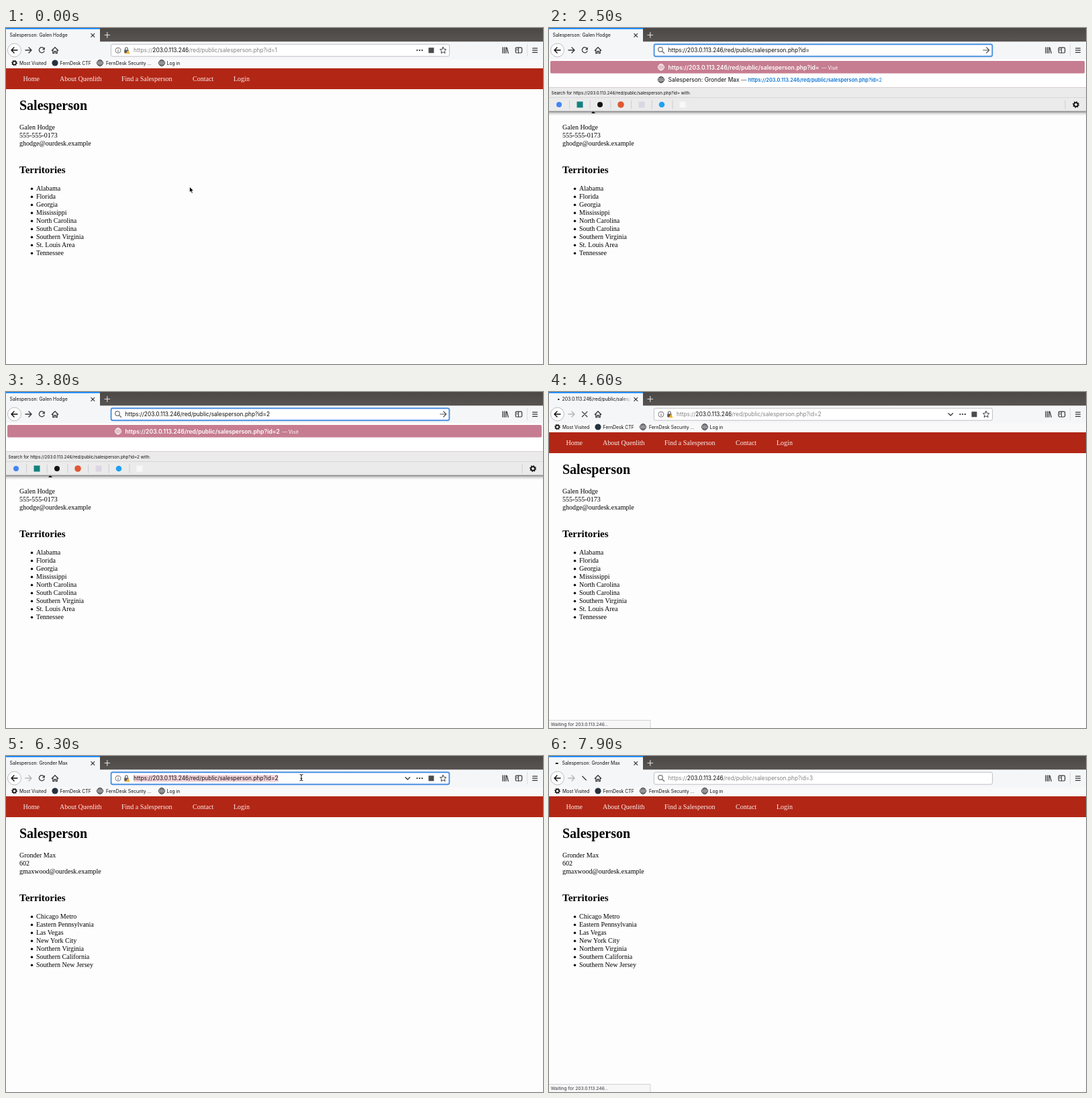
Write an HTML page that moves like this. It is 800 by 500 pixels and loops after 8000 ms.

```html
<!DOCTYPE html>
<html lang="en">
<head>
<meta charset="utf-8">
<title>Salesperson directory</title>
<style>
  html, body { margin: 0; width: 100%; height: 100%; overflow: hidden; background: #fff; }
  svg { display: block; width: 800px; height: 500px; }
  text { white-space: pre; font-family: Inter, "Open Sans", sans-serif; }
  .page text { font-family: "Liberation Serif", "Noto Serif", serif; }
</style>
</head>
<body>
<svg id="stage" viewBox="0 0 800 500"></svg>
<script>
const LOOP = 8000, STEP = 100;
const INK = '#0c0c0d', ICON = '#38383d', GREY = '#828285', URL_SIZE = 8.35;
const HOST = '203.0.113.246', PATH = '/red/public/salesperson.php?id=';
const BASE = 'https://' + HOST + PATH;

const PEOPLE = {
  1: {
    name: 'Galen Hodge', lines: ['Galen Hodge', '555-555-0173', 'ghodge@ourdesk.example'],
    areas: ['Alabama', 'Florida', 'Georgia', 'Mississippi', 'North Carolina', 'South Carolina',
      'Southern Virginia', 'St. Louis Area', 'Tennessee']
  },
  2: {
    name: 'Gronder Max', lines: ['Gronder Max', '602', 'gmaxwood@ourdesk.example'],
    areas: ['Chicago Metro', 'Eastern Pennsylvania', 'Las Vegas', 'New York City',
      'Northern Virginia', 'Southern California', 'Southern New Jersey']
  }
};

// One visit: focus the address, deselect, erase the digit, type another, press enter.
const VISITS = [
  { focus: 800, deselect: 1400, erase: 2000, type: 3200, enter: 4100, from: 1, to: 2 },
  { focus: 6000, deselect: 6500, erase: 6800, type: 7400, enter: 7700, from: 2, to: 3 }
];
const LOADED = 4900;

const svg = document.getElementById('stage');
const pen = document.createElement('canvas').getContext('2d');

function textWidth(s, size) {
  pen.font = `${size * 10}px Inter, "Open Sans", sans-serif`;
  return pen.measureText(s).width / 10;
}
const attrs = o => Object.entries(o).map(([k, v]) => `${k}="${v}"`).join(' ');
const text = (x, y, size, s, o = {}) =>
  `<text x="${x}" y="${y}" font-size="${size}" ${attrs({ fill: INK, ...o })}>${s}</text>`;
const span = (s, o) => `<tspan ${attrs(o)}>${s}</tspan>`;
const rect = (x, y, w, h, fill, o = {}) =>
  `<rect x="${x}" y="${y}" width="${w}" height="${h}" fill="${fill}" ${attrs(o)}/>`;
const dot = (x, y, r, fill, o = {}) =>
  `<circle cx="${x}" cy="${y}" r="${r}" fill="${fill}" ${attrs(o)}/>`;
const line = (d, stroke = ICON, w = 1.25, o = {}) =>
  `<path d="${d}" fill="none" stroke="${stroke}" stroke-width="${w}" stroke-linecap="round" stroke-linejoin="round" ${attrs(o)}/>`;
const title = id => 'Salesperson: ' + PEOPLE[id].name;

const globe = (x, y, c = ICON) => dot(x, y, 4.5, 'none', { stroke: c }) +
  line(`M${x - 4.5} ${y}h9M${x} ${y - 4.5}v9M${x - 3.5} ${y - 2.4}h7M${x - 3.5} ${y + 2.4}h7`, c, .7) +
  `<ellipse cx="${x}" cy="${y}" rx="2.2" ry="4.5" fill="none" stroke="${c}" stroke-width=".8"/>`;

const gear = (x, y, r) => dot(x, y, r * .62, 'none', { stroke: INK, 'stroke-width': r * .36 }) +
  dot(x, y, r * .88, 'none', { stroke: INK, 'stroke-width': r * .32, 'stroke-dasharray': `${r * .3} ${r * .391}` });

const magnifier = () => dot(166, 32, 3.3, 'none', { stroke: '#737377', 'stroke-width': 1.2 }) +
  line('M168.6 34.6l3 3', '#737377', 1.4);

function stateAt(t) {
  const visit = VISITS[t < 5500 ? 0 : 1];
  const loading = t >= 4100 && t < LOADED || t >= 7700;
  const focused = t >= visit.focus && t < visit.enter;
  const editing = t >= visit.erase && t < visit.enter;
  const typed = t >= visit.type;
  const shown = t < LOADED ? 1 : 2;
  const digit = t >= visit.type ? visit.to : t >= visit.erase ? '' : visit.from;
  const caretFrom = typed ? visit.type : t >= visit.erase ? visit.erase : visit.deselect;
  return {
    t, visit, loading, focused, editing, typed, shown, digit,
    sinceEnter: t - visit.enter,
    submitting: loading && t - visit.enter < 300,
    selected: focused && t < visit.deselect,
    caret: focused && t >= visit.deselect && (t - caretFrom) % 1000 < 500,
    pointer: pointerAt(t)
  };
}

function pointerAt(t) {
  if (t < 2000) {
    const p = Math.min(1, Math.max(0, (t - 200) / 500));
    const e = p * p * (3 - 2 * p);
    return { x: 274 + 166 * e, y: 237 - 205 * e };
  }
  return t >= 5600 && t < 6800 ? { x: 440, y: 32 } : null;
}

function page(s) {
  const person = PEOPLE[s.shown];
  const nav = [[25.5, 'Home'], [80, 'About Quenlith'], [172, 'Find a Salesperson'], [278, 'Contact'], [339, 'Login']];
  return '<g class="page">' + rect(0, 60, 800, 440, '#fefdfe') + rect(0, 60, 800, 31, '#b22615') +
    nav.map(([x, label]) => text(x, 79.3, 10, label, { fill: '#fbeeee' })).join('') +
    text(20, 122, 20, 'Salesperson', { 'font-weight': 700, fill: '#000' }) +
    person.lines.map((l, i) => text(20, 150.8 + 12 * i, 10, l, { fill: '#000' })).join('') +
    text(20, 215.6, 15, 'Territories', { 'font-weight': 700, fill: '#000' }) +
    person.areas.map((a, i) => dot(38.5, 239.2 + 12 * i, 1.7, '#000') +
      text(45, 241.8 + 12 * i, 10, a, { fill: '#000' })).join('') + '</g>';
}

function tabStrip(s) {
  const label = !s.loading ? title(s.shown) : s.sinceEnter < 300 ? title(s.shown) : HOST + PATH;
  const swing = Math.cos(s.sinceEnter / 500 * Math.PI);
  const stretch = 1.3 + 1.3 * (1 - Math.abs(swing));
  const throbber = rect(12.3 - swing * 2 - stretch, 9.9, stretch * 2, 2.2, INK, { rx: 1.1 });
  return rect(0, 0, 800, 20.5, 'url(#strip)') + rect(0, 0, 140, 21, '#f5f6f7') + rect(0, 0, 140, 1.7, '#0a84ff') +
    (s.loading ? throbber : '') +
    `<g clip-path="url(#tabClip)">${text(s.loading ? 19.5 : 5.5, 13.4, 6.875, label)}</g>` +
    rect(108, 5, 14.5, 12, 'url(#tabFade)') +
    line('M126.8 8.3l5 5m0-5l-5 5', ICON, 1.2) + line('M147 10.5h7.6m-3.8-3.8v7.6', '#dcdad9', 1.2);
}

function toolbar(s) {
  const forward = s.t < 4100 ? ICON : '#b5b5b8';
  const reload = line('M56.6 30.4A4 4 0 1 0 57 34.4') + `<path d="M57.8 28.5v4h-4z" fill="${ICON}"/>`;
  const stop = s.sinceEnter < 300 ? 'M49.8 30.2l5.5 5.6' : 'M49.4 29.4l7.4 7.4m0-7.4l-7.4 7.4';
  return rect(0, 20.5, 800, 39.5, '#f5f6f7') + rect(0, 46.5, 800, 13.5, '#f9f9fa') +
    dot(12.5, 33, 10, '#fdfdfd', { stroke: '#b6b6b8', 'stroke-width': .9 }) +
    line('M17 33H8m4-4l-4 4 4 4', INK, 1.4) + line('M29 33h9m-4-4l4 4-4 4', forward, 1.4) +
    (s.loading ? line(stop, ICON, 1.3) : reload) +
    line('M68.3 33.5l4.7-4.8 4.7 4.8M69.8 33v4.7h2v-3h2.4v3h2V33', ICON, 1.3) +
    line('M740 29v8.3m2.5-8.3v8.3m2.4-8.3v8.3m1.3-8l2 8', ICON, 1.3) +
    rect(759.2, 29.2, 9.4, 7.8, 'none', { rx: 1.4, stroke: ICON, 'stroke-width': 1.2 }) +
    line('M763.5 29.5v7.3M761 31.4h1m-1 1.8h1', ICON, 1) +
    line('M776.5 24v18', '#d8d8da', .8) + line('M784.6 30h6.8m-6.8 3.2h6.8m-6.8 3.2h6.8');
}

function bookmarks() {
  const item = (x, s) => text(x, 54.6, 6.875, s);
  return gear(12.5, 52, 4.2) + item(20, 'Most Visited') + dot(73, 52, 4.6, '#25323f') + item(80.5, 'FernDesk CTF') +
    globe(140, 52) + item(149, 'FernDesk Security ...') + globe(232, 52) + item(239.5, 'Log in');
}

function addressBar(s) {
  const plain = s.editing || s.submitting;
  const x = plain ? 177.5 : 190;
  const url = BASE + s.digit;
  const width = textWidth(url, URL_SIZE);
  const hovered = s.pointer && s.pointer.y < 43 || s.t >= 4400 && s.t < 7700;
  let out = s.focused
    ? rect(156.6, 24.2, 503.8, 18, '#fff', { rx: 2.4, stroke: '#4a90e2', 'stroke-width': 1.9 })
    : rect(156.4, 24.2, 504.2, 18, '#fff', { rx: 2.4, stroke: '#bfbfc2', 'stroke-width': 1 });
  if (s.selected) out += rect(x, 28.3, width, 10.2, '#f3d3d9');
  const label = s.focused ? url : span('https://', { fill: GREY }) + HOST + span(PATH + s.digit, { fill: GREY });
  out += text(x, 36.4, URL_SIZE, label);
  if (s.caret) out += rect(x + width + .2, 28.5, .8, 10, INK);
  if (plain) {
    out += magnifier();
    if (s.editing) out += line('M646.8 33h9m-4-4l4 4-4 4', '#55555a', 1.2);
    return out;
  }
  out += dot(167, 33.3, 4, 'none', { stroke: '#68686c', 'stroke-width': .9 }) +
    line('M167 33v2.3M167 31v.1', '#68686c', 1.1) +
    rect(176.2, 32.5, 6.4, 5, '#58585c', { rx: .8 }) +
    line('M177.5 32.5v-1.6a1.9 1.9 0 0 1 3.8 0v1.6', '#58585c', 1.1) +
    '<path d="M181.5 33l3.2 5.3h-6.4z" fill="#f5b11c"/>' +
    [612.5, 616.2, 619.9].map(cx => dot(cx, 33.2, 1.15, ICON)).join('') +
    rect(629.5, 29.3, 8, 8, '#4a4a4f', { rx: .5 }) +
    line('M651.2 28.5l1.4 3 3.3.4-2.4 2.3.6 3.3-2.9-1.6-2.9 1.6.6-3.3-2.4-2.3 3.3-.4z', ICON, 1);
  if (hovered) out += line('M595 31.7l3.3 3.3 3.3-3.3', ICON, 1.3);
  return out;
}

function resultRow(y, id, tail) {
  return globe(167, y) + text(177.5, y + 3, 8.45, title(id) + span(' — ', { fill: '#55555a' }) + tail);
}

function popup(s) {
  const first = s.visit.from === 1;
  const foot = first ? 88.5 : 107.5;
  const blue = '#0a74d1';
  const link = id => span(BASE, { fill: blue, 'font-size': 7.45, 'font-weight': 600 }) +
    span(id, { fill: blue, 'font-size': 7.45 });
  let out = rect(0, foot + 35, 800, 7, 'url(#shade)') + rect(0, 47, 800, foot - 47, '#fff') +
    rect(2, 49, 796, 18.5, '#c67d91', { rx: 1.8 }) + globe(167, 58.3, '#fff') +
    text(177.5, 61.5, 8.6, span(BASE + s.digit, { 'font-weight': 600 }) +
      span(' — Visit', { 'font-size': 7.3, dx: 1.5 }), { fill: '#fff' });
  if (!s.typed) {
    out += first ? resultRow(77, 2, link(2)) :
      rect(149.8, 73.5, 7.2, 5.2, '#58585c', { rx: .6 }) + rect(148.5, 78.6, 9.8, 1.7, '#58585c') +
      resultRow(77, 2, span('Switch to Tab', { fill: '#0b7fa9', 'font-size': 7.2 })) + resultRow(96, 1, link(1));
  }
  const cy = foot + 25.5;
  const square = (x, c) => rect(x - 4.5, cy - 4.5, 9, 9, c);
  out += rect(0, foot, 800, 35.8, '#ebebec') + line(`M0 ${foot}H800`, '#d4d4d6', .7) +
    line(`M0 ${foot + 15}H800`, '#cfcfd1', .7) +
    text(3.5, foot + 10, 6.3, `Search for ${BASE}${s.digit} with:`) +
    dot(15, cy, 4, '#4285f4') + square(46, '#12827f') + dot(76, cy, 4, '#111') + dot(107, cy, 4.8, '#de5833') +
    square(138, '#dcd6e4') + dot(168, cy, 4.3, '#1da1f2') + square(199, '#f8f8f8');
  for (let i = 0; i < 6; i++) out += line(`M${30.5 + 30.7 * i} ${cy - 6}v12`, '#c6c6c9', .8);
  return out + line(`M769 ${cy - 6}v12`, '#c6c6c9', .8) + gear(785, cy, 4.8) +
    line(`M0 ${foot + 35.6}H800`, '#77777a', .9);
}

function statusBar() {
  return rect(-1, 488.6, 152, 13, '#f7f7f8', { stroke: '#c9c9cb', 'stroke-width': .8 }) +
    text(2.8, 497.2, 6.75, `Waiting for ${HOST}...`, { fill: '#38383d' });
}

function pointer({ x, y }) {
  if (y < 43) {
    const beam = `M${x - 2} ${y - 4.6}q2 0 2 1.5v6.4q0 1.5 -2 1.5M${x + 2} ${y - 4.6}q-2 0-2 1.5m0 6.4q0 1.5 2 1.5M${x - 1} ${y + 1.4}h2`;
    return line(beam, '#fff', 2) + line(beam, '#111', 1);
  }
  return `<path d="M${x - .5} ${y - .8}v8.4l1.9-1.7 1.4 3.2 1.5-.7-1.4-3.1h2.6z" fill="#000" stroke="#fff" stroke-width=".7"/>`;
}

const gradient = (id, dir, stops) => `<linearGradient id="${id}" x1="0" y1="0" ${dir}="1" ${dir === 'y2' ? 'x2="0"' : 'y2="0"'}>` +
  stops.map(([c, a], i) => `<stop offset="${i / (stops.length - 1)}" stop-color="${c}" stop-opacity="${a}"/>`).join('') +
  '</linearGradient>';

const DEFS = '<defs>' + gradient('strip', 'y2', [['#4b4846', 1], ['#575452', 1]]) +
  gradient('tabFade', 'x2', [['#f5f6f7', 0], ['#f5f6f7', 1]]) +
  gradient('shade', 'y2', [['#000', .5], ['#000', .14], ['#000', 0]]) +
  '<clipPath id="tabClip"><rect width="122" height="20"/></clipPath></defs>';

function scene(t) {
  const s = stateAt(t);
  return DEFS + page(s) + tabStrip(s) + toolbar(s) + bookmarks() + addressBar(s) +
    (s.editing ? popup(s) : '') +
    (s.loading && s.sinceEnter >= 200 ? statusBar() : '') +
    (s.pointer ? pointer(s.pointer) : '');
}

let last = -1;
const start = performance.now();
function tick(now) {
  const t = Math.floor(Math.max(0, now - start) % LOOP / STEP) * STEP;
  if (t !== last) svg.innerHTML = scene(last = t);
  requestAnimationFrame(tick);
}
tick(start);
</script>
</body>
</html>
```
